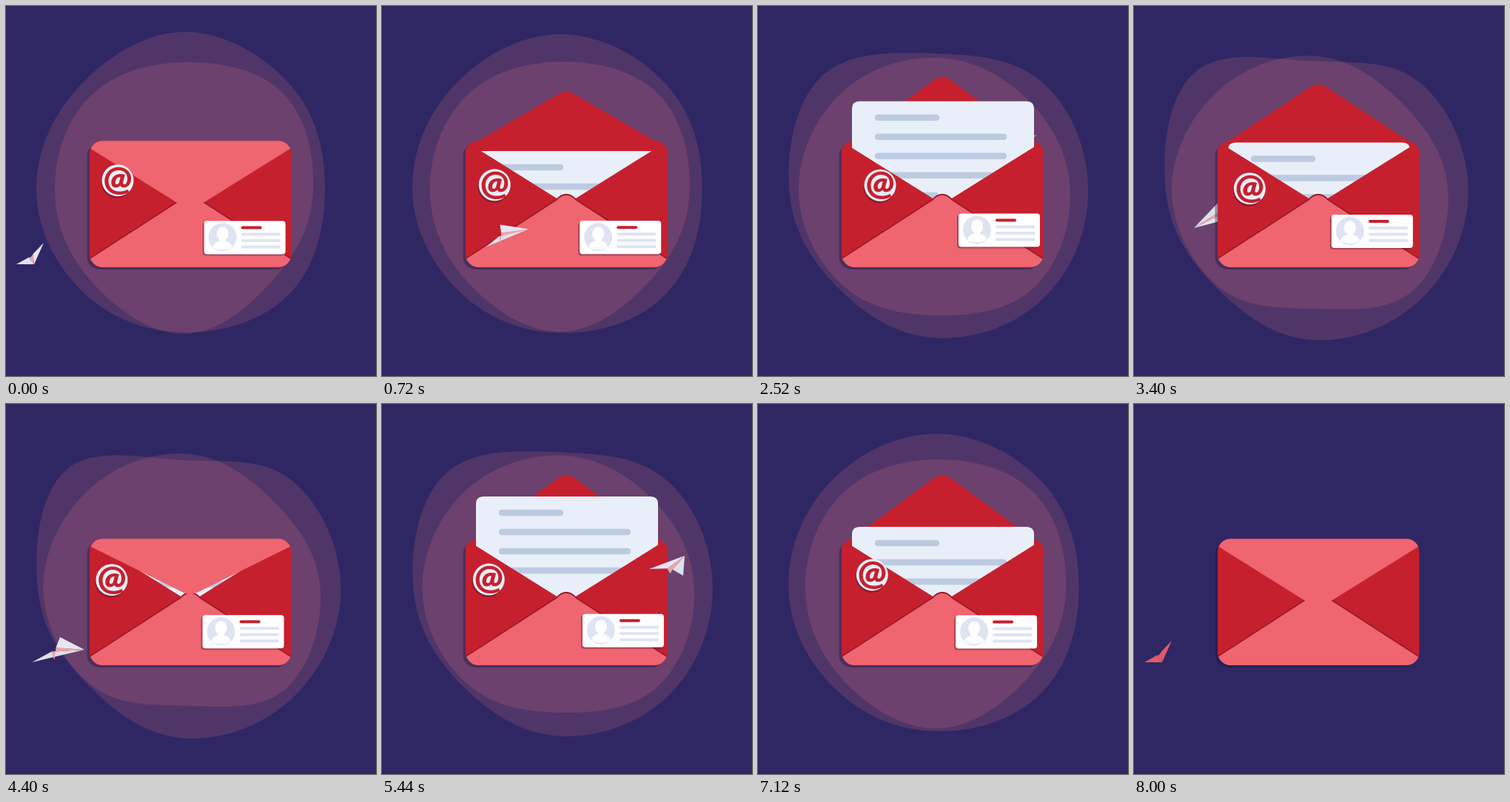
An HTML page that plays this animation: 500x500 px, repeating every 8040 ms.

```html
<!DOCTYPE html>
<html lang="en">
<head>
<meta charset="utf-8">
<title>Envelope</title>
<style>
  html, body { margin: 0; width: 100%; height: 100%; overflow: hidden; background: #2f2763; }
  svg { display: block; width: 100vw; height: 100vh; }
</style>
</head>
<body>
<svg viewBox="0 0 500 500">
  <defs>
    <clipPath id="bodyClip"><rect x="113.300" y="182.300" width="272" height="170.500" rx="17"/></clipPath>
    <clipPath id="faceClip"><circle cx="25" cy="22" r="19"/></clipPath>
  </defs>
  <g id="blobs" fill="#f07f80" fill-opacity=".17">
    <path id="outerBlob"/><path id="innerBlob"/>
  </g>
  <g id="behind"></g>
  <rect x="109.500" y="185.500" width="272" height="170.500" rx="17" fill="#1b1440" opacity=".4"/>
  <rect x="113.300" y="182.300" width="272" height="170.500" rx="17" fill="#c6202e"/>
  <path id="flapOpen" fill="#c6202e"/>
  <g id="letter">
    <path d="M0 150V10Q0 0 10 0H236Q246 0 246 10V150Z" fill="#e9eff8"/>
    <g stroke="#bdcbe1" stroke-width="8.500" stroke-linecap="round">
      <path d="M35 22H114M35 48H205M35 74H205M35 100H205"/>
      <path id="lastLine" d="M35 127H113"/>
    </g>
  </g>
  <g clip-path="url(#bodyClip)">
    <path d="M113 183L249 268L385 183H386V353H113Z" fill="#c6202e"/>
    <path d="M105 347L236 262Q249 248 262 262L393 347V360H105Z" fill="#ef6570" stroke="#961a2b" stroke-width="2.400"/>
    <path d="M105 347.500L236 262.800Q249 248.800 262 262.800L393 347.500V360H105Z" fill="#ef6570"/>
    <path id="flapClosed" fill="#ef6570"/>
  </g>
  <g id="badges">
    <g id="at">
      <circle cx="-1" cy="2.500" r="21.500" fill="#4a1030" opacity=".45"/>
      <circle r="21.500" fill="#e9edf7"/>
      <text y="13" text-anchor="middle" font-family="Lato, 'Open Sans', sans-serif" font-weight="900" font-size="46" fill="#c6202e">@</text>
    </g>
    <g id="card">
      <rect x="-2" y="2" width="110" height="45" rx="4" fill="#4a1030" opacity=".4"/>
      <rect width="110" height="45" rx="4" fill="#fff"/>
      <circle cx="25" cy="22" r="19" fill="#dfe4f3"/>
      <g fill="#fff" clip-path="url(#faceClip)">
        <ellipse cx="25" cy="17.500" rx="8" ry="9.500"/>
        <rect x="21" y="23" width="8" height="7"/>
        <path d="M12 36Q13 27 25 27Q37 27 38 36Q25 42 12 36Z"/>
      </g>
      <g stroke-width="4" stroke-linecap="round">
        <path d="M52 9H76" stroke="#c6202e"/>
        <path d="M52 18H101.500M52 26.500H101.500M52 35H101.500" stroke="#dfe4f3"/>
      </g>
    </g>
  </g>
  <g id="front">
    <g id="plane"><path id="wingB"/><path id="keel"/><path id="wingA"/></g>
  </g>
</svg>
<script>
const LOOP = 8040, CYCLE = 4000, STEP = 40, BLINK = 8000;
const { sin, cos, PI } = Math;
const $ = id => document.getElementById(id);
const draw = (id, d) => $(id).setAttribute('d', d);
const move = (id, x, y) => $(id).setAttribute('transform', `translate(${x} ${y})`);
const show = (id, on) => $(id).setAttribute('visibility', on ? 'visible' : 'hidden');
const mix = (a, b, u) => a + (b - a) * u;
const clamp = u => Math.min(1, Math.max(0, u));
const ease = (t, from, to) => (1 - cos(PI * clamp((t - from) / (to - from)))) / 2;

// Radii of the two extreme blob shapes, clockwise from east.
const OUTER = [[189, 198, 191, 194, 201, 201, 215, 202], [211, 207, 202, 184, 199, 228, 173, 206]];
const INNER = [[173, 169, 193, 176, 176, 181, 174, 187], [183, 192, 157, 182, 192, 187, 183, 168]];

function drawBlob(id, [from, to], u) {
  const n = from.length;
  const pts = from.map((r, i) => {
    const a = i * 2 * PI / n, radius = mix(r, to[i], u);
    return [242 + radius * cos(a), 250 + radius * sin(a)];
  });
  const p = i => pts[(i + n) % n];
  const handle = (i, s) => [0, 1].map(k => p(i)[k] + s * (p(i + 1)[k] - p(i - 1)[k]) * 0.187);
  let d = `M${p(0)}`;
  for (let i = 0; i < n; i++) d += `C${handle(i, 1)} ${handle(i + 1, -1)} ${p(i + 1)}`;
  draw(id, d + 'Z');
}

// Both badges float on a few slow harmonics of the loop.
function drawBadges(a) {
  move('at',
    153 + 7 * sin(a) + 2 * cos(a) - 5 * sin(2 * a) - 4 * cos(2 * a),
    238.7 + 4 * sin(a) - 3 * cos(a) + 3.5 * sin(3 * a));
  move('card',
    268.2 - 2 * cos(2 * a) + 1.5 * cos(3 * a),
    284.9 + 3 * cos(a) + 2 * sin(2 * a) + 2.5 * cos(2 * a));
}

function drawEnvelope(phase) {
  const hinge = 192;
  const tip = mix(277, 92, ease(phase, 290, 840) - ease(phase, 3310, 3900));
  const shoulder = mix(tip, hinge, 10 / 136);
  const flap = `V${hinge}L239 ${shoulder}Q249 ${tip} 259 ${shoulder}L385.3 ${hinge}`;
  const open = tip < hinge;
  draw('flapOpen', open ? `M113.3 200${flap}V200Z` : '');
  draw('flapClosed', open ? '' : `M113 182${flap}V182Z`);
  move('letter', 127, mix(196, 125, ease(phase, 760, 1320) - ease(phase, 2300, 3795)));
}

// Key poses of the plane: time, nose, forward vector, sideways vector.
const POSES = [
  [0, 38, 349, 5.5, 14.5, 18.5, -14.5],
  [400, 106, 332, 52, 0, 19, -17],
  [1440, 409, 205, 25, -22.5, -23, -4.5],
  [1950, 453, 150, -3, -14, -18, 5],
  [3400, 81, 300, -55, 30.5, 14, 12.5]
];

// Monotone cubic interpolation through the poses of one cycle.
function poseAt(phase) {
  const n = POSES.length;
  const pose = i => POSES[(i + n) % n];
  const time = i => pose(i)[0] + Math.floor(i / n) * CYCLE;
  const slope = (i, c) => (pose(i + 1)[c] - pose(i)[c]) / (time(i + 1) - time(i));
  const tangent = (i, c) => {
    const a = slope(i - 1, c), b = slope(i, c);
    return a * b > 0 ? 2 * a * b / (a + b) : 0;
  };
  let i = n - 1;
  while (POSES[i][0] > phase) i--;
  const span = time(i + 1) - time(i), u = (phase - time(i)) / span, v = 1 - u;
  return [1, 2, 3, 4, 5, 6].map(c =>
    mix(pose(i)[c], pose(i + 1)[c], u * u * (3 - 2 * u)) +
    span * u * v * (tangent(i, c) * v - tangent(i + 1, c) * u));
}

function drawPlane(phase, plain) {
  const [nx, ny, fx, fy, sx, sy] = poseAt(phase);
  const mx = nx - fx, my = ny - fy;
  const nose = [nx, ny], tipA = [mx + sx, my + sy], tipB = [mx - sx, my - sy];
  const keel = [mx + 0.22 * fx, my + 0.22 * fy + 0.27 * Math.max(fx, 0)];
  const fold = (near, far) => nose.map((v, k) => 0.2 * v + 0.48 * near[k] + 0.32 * far[k]);
  const foldA = fold(tipA, tipB), foldB = fold(tipB, tipA);
  const poly = (id, color, ...pts) => {
    draw(id, `M${pts.join('L')}Z`);
    $(id).setAttribute('fill', plain ? '#e05a6a' : color);
  };
  poly('wingB', '#dce0ee', nose, tipB, foldB);
  poly('keel', '#f0a3a8', nose, foldB, keel, foldA);
  poly('wingA', '#e4e7f4', nose, tipA, foldA);
  const layer = $(phase > 1950 ? 'behind' : 'front');
  if ($('plane').parentNode !== layer) layer.appendChild($('plane'));
}

function render(t) {
  const phase = t % CYCLE, angle = 2 * PI * t / LOOP, bare = t >= BLINK;
  const morph = (1 - cos(angle)) / 2;
  drawBlob('outerBlob', OUTER, morph);
  drawBlob('innerBlob', INNER, morph);
  drawBadges(angle);
  drawEnvelope(phase);
  drawPlane(phase, bare);
  show('blobs', !bare);
  show('badges', !bare);
  show('lastLine', t < CYCLE);
}

const start = performance.now();
function tick() {
  const t = (performance.now() - start) % LOOP;
  render(Math.floor(t / STEP) * STEP);
  requestAnimationFrame(tick);
}
render(0);
requestAnimationFrame(tick);
</script>
</body>
</html>
```
